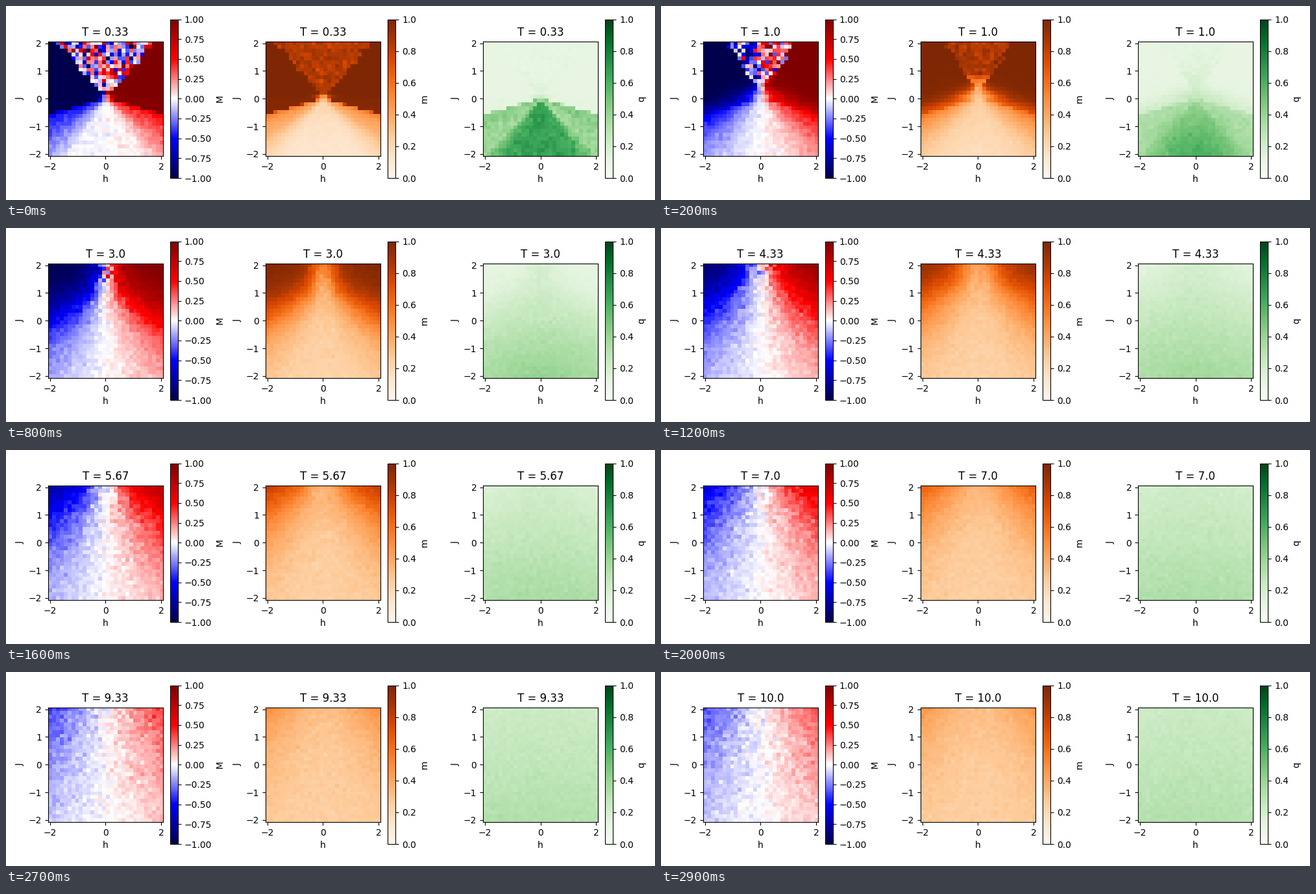
Animation, 1000 px wide and 300 px high, one loop 3000 ms. Source, as a matplotlib script:

```python
import numpy as np
import matplotlib.pyplot as plt
from matplotlib.animation import FuncAnimation

FRAMES, CELLS = 30, 30
axis = np.linspace(-2, 2, CELLS)
h, J = np.meshgrid(axis, axis)
edge = 2 + (axis[1] - axis[0]) / 2
sign, strength = np.sign(h), np.abs(h)


def magnetization(T):
    """Mean-field curve, softened around h = 0 and stepped at low T."""
    coupling = np.where(J > 0, 2.4, 4.0) * J
    step = np.where(J > 0, 0.4, 1 / (1 + np.abs(coupling) / T))
    M = np.tanh(strength / T)
    for _ in range(200):
        M = M + step * (np.tanh((strength + coupling * M) / T) - M)
    order = np.clip(2.4 * J / T, 0, 1) ** 2
    width = min(0.16 * T, 0.7) * order + 1e-6
    M = M * np.tanh(strength / width)
    ratio = strength / np.maximum(-J, 1e-6)
    steps = np.interp(ratio, [0, .6, 1, 1.5, 2.5, 3.5, 3.8],
                      [0, .03, .18, .33, .42, .55, .98])
    frozen = np.where(J < 0, np.exp(-((T - 1 / 3) / 0.5)), 0)
    return (1 - frozen) * M + frozen * steps, frozen, ratio, coupling


def fields(frame):
    T = (frame + 1) / 3
    heat = T - 1 / 3
    rng = np.random.default_rng(40 + frame)
    noise = lambda: rng.standard_normal(h.shape)
    mean, frozen, ratio, coupling = magnetization(T)

    # Metastable domains fill a wedge around h = 0 for positive J.
    reach = 0.85 * J * np.exp(-heat / 1.6)
    wedge = (J > 0.25 + 0.4 * heat) & (strength < reach + 0.05 * noise() * J)
    mean = np.where(wedge, np.clip(heat / 2, 0, 0.9) * mean, mean)

    spread = 1 - mean ** 2
    chi = spread / np.clip(1 - coupling * spread / T, 0.1, 2)
    domain_sigma = 0.45 * np.clip(J, 0, 1) * np.exp(-heat / 4)
    sigma = np.where(wedge, domain_sigma, 0.038 * np.sqrt(chi))
    M = np.clip(sign * mean + sigma * noise(), -1, 1)

    K = J / T
    pos, neg = np.maximum(K, 0), np.maximum(-K, 0)
    clump = np.where(K > 0, np.exp(np.minimum(1.4 * pos + 1.4 * pos ** 2, 2.3)),
                     0.2 + 0.8 * np.exp(-0.6 * neg))
    m = np.sqrt(mean ** 2 + 0.07 * spread * clump)
    m += 0.013 * np.sqrt(spread * clump) * noise()

    stagger = np.where(K < 0,
                       np.minimum(1 + 1.8 * neg * np.exp(-h ** 2 / (2.4 * T)), 6),
                       0.16 + 0.84 * np.exp(-1.6 * pos))
    q = np.sqrt(mean ** 2 / 81 + 0.073 * spread * stagger)
    plateau = np.interp(ratio, [0, .65, 1, 1.7, 2, 3.5, 3.8],
                        [.67, .64, .39, .38, .45, .42, .12])
    q = (1 - frozen) * q + frozen * plateau
    q += (0.012 + 0.02 * frozen) * np.sqrt(spread) * noise()
    return M, np.clip(m, 0, 1), np.clip(q, 0.1, 1)


fig, axes = plt.subplots(1, 3, figsize=(10, 3), dpi=100)


def fill_panel(ax, name, cmap, low):
    image = ax.imshow(np.zeros(h.shape), cmap=cmap, vmin=low, vmax=1,
                      origin="lower", extent=[-edge, edge, -edge, edge],
                      interpolation="nearest")
    ax.set(xlabel="h", ylabel="J", xticks=[-2, 0, 2], yticks=range(-2, 3))
    ticks = np.linspace(low, 1, 9 if low else 6)
    fig.colorbar(image, ax=ax, label=name, ticks=ticks)
    return image, ax.set_title("T = 0.33")


styles = [("M", "seismic", -1), ("m", "Oranges", 0), ("q", "Greens", 0)]
panels = [fill_panel(ax, *style) for ax, style in zip(axes, styles)]
fig.tight_layout()


def update(frame):
    label = f"T = {round((frame + 1) / 3, 2)}"
    for (image, title), values in zip(panels, fields(frame)):
        image.set_data(values)
        title.set_text(label)
    return [artist for panel in panels for artist in panel]


anim = FuncAnimation(fig, update, frames=FRAMES, interval=100, repeat=True,
                     repeat_delay=0, init_func=lambda: update(0))
plt.show()
```
